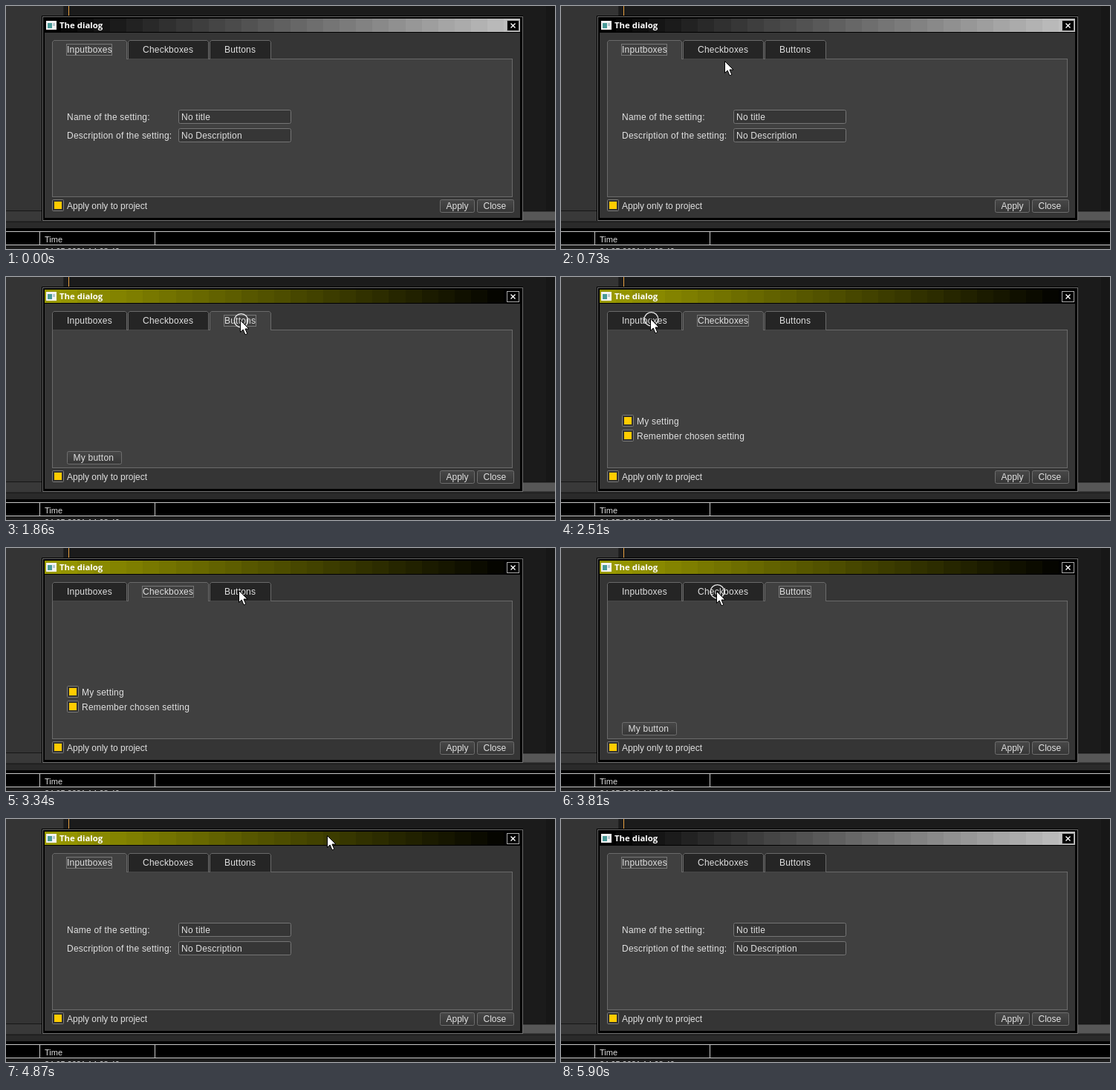
Recreate the animation shown at these times as an HTML page. Size 739x328 px, loop 6000 ms.

```html
<!DOCTYPE html>
<html lang="en">
<head>
<meta charset="utf-8">
<title>The dialog</title>
<style>
  html, body { margin: 0; width: 100%; height: 100%; overflow: hidden; background: #1b1b1b; }
  svg { display: block; }
  text { font: 12px "Liberation Sans", Arial, sans-serif; fill: #e0e0e0; white-space: pre; }
  .wide text { letter-spacing: .22px; }
  text.small { font-size: 11px; }
  text.title { font: bold 11.4px "Open Sans", "Noto Sans", sans-serif; fill: #fff; }
</style>
</head>
<body>
<svg id="stage" width="739" height="328" viewBox="0 0 739 328">
  <defs>
    <linearGradient id="button" x2="0" y2="1"><stop stop-color="#484848"/><stop offset="1" stop-color="#363636"/></linearGradient>
  </defs>
  <g id="back"></g>
  <g id="frame"></g>
  <g id="titleBar"></g>
  <g id="tabs" class="wide"></g>
  <g id="pages" class="wide"></g>
  <g id="footer"></g>
  <g id="pointer">
    <circle id="ring" cx="1.5" cy=".8" r="9.2" fill="none" stroke="#e8e8e8" stroke-width="1.3"/>
    <path d="M.5 .5V16.5L4.2 13 7 19.8 9.8 18.6 7 12H12Z" fill="#fff" stroke="#000"/>
  </g>
</svg>
<script>
const $ = id => document.getElementById(id);

const rect = (x, y, w, h, fill, extra = '') =>
  `<rect x="${x}" y="${y}" width="${w}" height="${h}" fill="${fill}" ${extra}/>`;
const box = (x, y, w, h, fill, line, r = 0) =>
  rect(x + .5, y + .5, w - 1, h - 1, fill, `stroke="${line}" rx="${r}"`);
const row = (y, h, fill) => rect(0, y, 739, h, fill);
const label = (x, y, s, cls = '') => `<text x="${x}" y="${y}" class="${cls}">${s}</text>`;
const button = (x, y, w, s) => box(x, y, w, 18, 'url(#button)', '#6e6e6e', 2) + label(x + 8.5, y + 13, s);
const check = (x, y, s) =>
  box(x, y, 16, 16, '#303030', '#7c7c7c', 1) + rect(x + 3, y + 3, 10, 10, '#ffcc00') + label(x + 20, y + 13, s);
const field = (y, name, value) =>
  label(82, y + 14, name) + box(232, y, 152, 19, '#363636', '#757575', 2) + label(236, y + 14, value);

$('back').innerHTML =
  rect(0, 0, 77, 276, '#343434') + rect(77, 0, 1, 276, '#222') + rect(727, 0, 12, 276, '#171717') +
  rect(84, 0, 1, 14, '#e8a040') +
  row(276, 1, '#161616') + row(277, 13, '#393939') + rect(694, 278, 45, 11, '#575757') +
  row(290, 13, '#2a2a2a') + row(291, 1, '#1c1c1c') + row(300, 28, '#000') +
  row(304, 1, '#c8c8c8') + row(322, 1, '#c8c8c8') + row(323, 5, '#1c1c1c') +
  [45, 200].map(x => rect(x, 305, 1, 17, '#c8c8c8')).join('') +
  label(52, 319, 'Time', 'small') + label(52, 335, '24.05.2021 14:08:40', 'small');

$('frame').innerHTML =
  rect(48, 13, 648, 277, '#000') + box(49, 14, 647, 276, '#000', '#6c6c6c') + rect(52, 36, 640, 250, '#353535') +
  box(62, 71, 620, 187, '#404040', '#6a6a6a');

$('footer').innerHTML =
  check(62, 261, 'Apply only to project') + button(584, 261, 47, 'Apply') + button(634, 261, 50, 'Close');

const STEPS = 29;
function titleBar(active) {
  let s = '';
  for (let i = 0; i < STEPS; i++) {
    const u = i / (STEPS - 1), x = 52 + Math.round(i * 640 / STEPS);
    const v = Math.round(active ? 153 * (1 - u) : 192 * u);
    s += rect(x, 17, 692 - x, 18, `rgb(${v},${v},${active ? 0 : v})`);
  }
  return s + rect(54, 20, 14, 12, '#f4f4f4') + rect(56, 23, 6, 7, '#4a9a98') + rect(63, 23, 3, 4, '#b8c8d0') +
    label(72, 30, 'The dialog', 'title') + box(674, 19, 17, 15, '#000', '#aaa') +
    '<path d="M679.5 23.5l6 6m0-6l-6 6" stroke="#fff" stroke-width="1.4"/>';
}

const TABS = [[62, 101, 'Inputboxes'], [164, 109, 'Checkboxes'], [274, 83, 'Buttons']];
const tabBar = page => TABS.map(([x, w, s], i) => {
  const on = i === page, r = x + w - .5;
  return `<path d="M${x + .5} 71.5V48.5l2-2H${r - 2}l2 2V71.5" fill="${on ? '#404040' : '#252525'}" stroke="#6a6a6a"/>` +
    (on ? rect(x + 1, 71, w - 2, 1, '#404040') +
      rect(x + 19.5, 51.5, w - 40, 15, 'none', 'stroke="#b0b0b0" stroke-dasharray="1 1"') : '') +
    label(x + 20, 63, s);
}).join('');

const PAGES = [
  field(140, 'Name of the setting:', 'No title') + field(165, 'Description of the setting:', 'No Description'),
  check(82, 186, 'My setting') + check(82, 206, 'Remember chosen setting'),
  button(82, 235, 74, 'My button')
];

const LOOP = 6000, FROM = 440, GONE = 5340, INACTIVE = 5900;
const TICK = 59.1;              // screen recorder's frame time
const LEAD = 110, REST = 120;   // pointer rests before and after a click

// Each click: time, tab, pointer position
const CLICKS = [
  [1090, 1, 208, 50], [1800, 2, 315, 58], [2160, 1, 209, 58], [2570, 0, 120, 56],
  [2990, 1, 208, 58], [3460, 2, 313, 57], [3870, 1, 209, 58], [4330, 0, 113, 57]
];
const easeOut = u => 1 - (1 - u) ** 3;
const linear = u => u;

// The pointer comes from below, visits the tabs and leaves over the title bar
const PATH = [
  [FROM, 332, 312],
  ...CLICKS.flatMap(([t, , x, y]) => [[t - LEAD, x, y, easeOut], [t + REST, x, y]]),
  [4870, 429, 22], [5000, 575, 5], [5110, 687, 188], [GONE, 735, 350]
];

function pointerAt(t) {
  const i = PATH.findIndex(p => t < p[0]);
  const [a, x, y] = PATH[i - 1], [b, x2, y2, ease = linear] = PATH[i];
  const u = ease((t - a) / (b - a));
  return [x + (x2 - x) * u, y + (y2 - y) * u].map(Math.round);
}

let shownPage = -1, shownActive;
function draw(now) {
  const t = FROM + Math.floor((now - FROM + 15) / TICK) * TICK;
  const active = t >= CLICKS[0][0] && now < INACTIVE;
  const page = CLICKS.reduce((p, [at, tab]) => t >= at ? tab : p, 0);
  if (active !== shownActive) $('titleBar').innerHTML = titleBar(shownActive = active);
  if (page !== shownPage) {
    $('tabs').innerHTML = tabBar(page);
    $('pages').innerHTML = PAGES[shownPage = page];
  }
  const visible = t >= FROM && t < GONE;
  $('pointer').style.display = visible ? '' : 'none';
  if (!visible) return;
  $('pointer').setAttribute('transform', `translate(${pointerAt(t)})`);
  $('ring').style.display = CLICKS.some(([at]) => t > at - 70 && t < at + 70) ? '' : 'none';
}

const start = performance.now();
function loop() {
  draw((performance.now() - start) % LOOP);
  requestAnimationFrame(loop);
}
loop();
</script>
</body>
</html>
```
